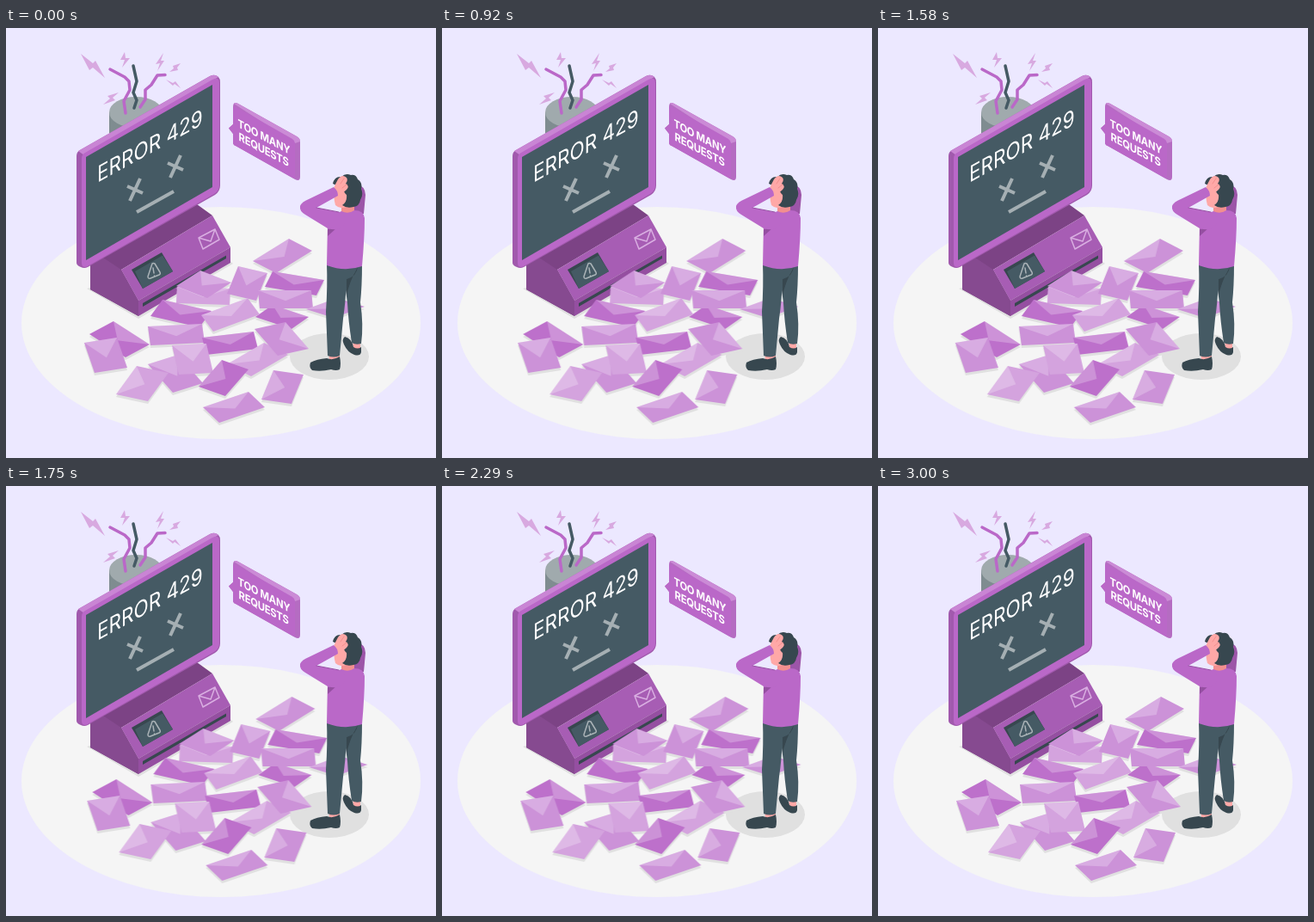
An HTML page that plays this animation: 500x500 px, repeating every 3.04 s.

```html
<!DOCTYPE html>
<html lang="en">
<head>
<meta charset="utf-8">
<title>Error 429</title>
<style>
  html, body { margin: 0; width: 100%; height: 100%; overflow: hidden; background: #ece8ff; }
  svg { display: block; width: 100%; height: 100%; }
  text { font-family: Inter, "Open Sans", sans-serif; fill: #fff; }
  .title { font-size: 26px; }
  .label { font-size: 13px; font-weight: 700; letter-spacing: -.3px; }
  .line { fill: none; stroke-linejoin: round; stroke-linecap: round; }
  .wire { stroke-width: 3.5; }
  .dark { color: #bd70cb; }
  .mid { color: #cc92d8; }
  .light { color: #d4a3de; }
  .mail { filter: drop-shadow(0 3px 0 #e0e0e0); animation: shake 3040ms linear -25ms infinite; }

  /* a three second shake followed by a 40 ms rest */
  @keyframes shake {
    0%, 98.68%, 100% { transform: translateX(0); }
    9.87%, 88.82% { transform: translateX(-1px); }
    19.74%, 78.95% { transform: translateX(2px); }
    29.61%, 49.34%, 69.08% { transform: translateX(-4px); }
    39.47%, 59.21% { transform: translateX(4px); }
  }
</style>
</head>
<body>
<svg viewBox="0 0 500 500">
  <defs>
    <g id="env">
      <path d="M0 0H1V1H0Z" fill="currentColor"/>
      <path d="M0 0H1L.5 .58Z" fill="#fff" opacity=".24"/>
    </g>
  </defs>

  <!-- floor -->
  <ellipse cx="250" cy="343" rx="232" ry="135" fill="#f5f5f5"/>
  <ellipse cx="376" cy="382" rx="46" ry="27" fill="#e0e0e0"/>
  <path d="M94 303L154 338L264 274L250 262Z" fill="#e0e0e0"/>

  <!-- sparks -->
  <g fill="#d8a9e0">
    <path d="M87 30L101 41L104 38L115 58L101 46L97 49Z"/>
    <path d="M138 28L133 37L138 37L135 46L144 35L139 35Z"/>
    <path d="M131 75L118 79L121 82L113 89L127 84L124 81Z"/>
    <path d="M183 29L174 42L179 41L176 50L184 38L180 38Z"/>
    <path d="M203 41L194 44L195 47L190 51L200 49L199 46Z"/>
    <path d="M186 60L194 67L196 65L203 70L197 62L194 64Z"/>
  </g>

  <!-- pipe and wires -->
  <path d="M120 98V130L182 100V98Z" fill="#7f8c90"/>
  <ellipse cx="151" cy="98" rx="31" ry="18" fill="#a0aaad"/>
  <g class="line wire">
    <path d="M121 48L138 57L143 62L144 72L137 85L139 99" stroke="#ba68c8"/>
    <path d="M148 44L152 62L148 75L152 84L149 93" stroke="#455a64"/>
    <path d="M185 54.500L176 55L169 66L162 72L162 83L156 92" stroke="#ba68c8"/>
  </g>

  <!-- console -->
  <path d="M98 275L113 265L222 205L240 218L134 281L154 317V335L98 304Z" fill="#7c4385"/>
  <path d="M98 275L113 267L134 281L154 317V335L98 304Z" fill="#864a90"/>
  <path d="M134 281L240 218L261 255L154 317Z" fill="#a75db4"/>
  <path d="M154 317L261 255V273L154 335Z" fill="#954fa1"/>
  <path d="M159 320L256 264.500V268L159 324Z" fill="#37474f"/>
  <path d="M146 281L181 261L194 283L159 303Z" fill="#37474f"/>
  <path d="M150 283L182 264.500L194 283L159 303Z" fill="#455a64"/>
  <g class="line" stroke="#aab3b7" stroke-width="1.500">
    <path d="M170 274L165 289Q165 292 168 291L178 287Q180 286 179 284L173 274Q171 273 170 274Z"/>
    <path d="M171 279L172 285M172.500 288V288.200"/>
  </g>
  <path class="line" d="M224 244L243 234L248 246L229 257ZL238 248L243 234" stroke="#d9aee1" stroke-width="1.500"/>

  <!-- monitor -->
  <path d="M82 149Q82 144 86 142L237 56Q243 53 247 57Q249 59 249 63V183Q249 190 243 194L95 278Q91 280 87 278Q82 276 82 273Z" fill="#a159ad"/>
  <path d="M84 143L237 56Q243 53 247 57L91 148Z" fill="#c985d4"/>
  <path d="M88 152Q88 147 92 145L240 60Q248 56 248 64V183Q248 189 242 193L95 277Q88 280 88 273Z" fill="#ba68c8"/>
  <path d="M93 150L240 66V185L93 270Z" fill="#455a64"/>
  <text class="title" transform="matrix(.866 -.48 0 1 106 180)">ERROR 429</text>
  <g fill="none" stroke="#a5afb3" stroke-width="4">
    <path d="M141 184L159 192M144 201L156 175"/>
    <path d="M188 157L206 165M191 174L203 148"/>
    <path d="M152 214L195 190"/>
  </g>

  <!-- speech bubble -->
  <path d="M264 112L259 116.500L264 123V133Q264 136 267 137L336 176Q342 179 342 173V132Q342 128 338 126L270 88Q264 85 264 92Z" fill="#b56cc2"/>
  <path d="M265 88Q267 86 270 88L338 126Q342 128 342 132L336 134Z" fill="#cb8bd6"/>
  <path d="M264 112L259 116.500L264 123V133Q264 136 267 137L333 174Q336 176 336 172V134Q336 131 333 129L268 92Q264 90 264 94Z" fill="#ba68c8"/>
  <text class="label" transform="matrix(.866 .46 0 1 269.500 115)">TOO MANY</text>
  <text class="label" transform="matrix(.866 .46 0 1 270.500 130.500)">REQUESTS</text>

  <!-- mail: flap edge, side edge, corner -->
  <g class="mail">
    <use href="#env" class="mid" transform="matrix(42 -26 27 14 287 271)"/>
    <use href="#env" class="light" transform="matrix(62 2 -1 19 199 301)"/>
    <use href="#env" class="mid" transform="matrix(34 8 -13 32 270 277)"/>
    <use href="#env" class="dark" transform="matrix(60 10 -9 18 310 283)"/>
    <use href="#env" class="dark" transform="matrix(42 14 -20 14 310 322)"/>
    <use href="#env" class="mid" transform="matrix(62 0 2 21 293 305)"/>
    <use href="#env" class="mid" transform="matrix(36 -13 32 10 349 327)"/>
    <use href="#env" class="dark" transform="matrix(57 13 -14 19 182 316)"/>
    <use href="#env" class="light" transform="matrix(54 -20 14 19 227 334)"/>
    <use href="#env" class="mid" transform="matrix(36 14 -28 18 226 282)"/>
    <use href="#env" class="dark" transform="matrix(42 27 -28 15 125 341)"/>
    <use href="#env" class="mid" transform="matrix(38 -6 12 35 91 366)"/>
    <use href="#env" class="mid" transform="matrix(63 -3 3 22 165 347)"/>
    <use href="#env" class="dark" transform="matrix(60 -7 5 20 228 360)"/>
    <use href="#env" class="light" transform="matrix(43 -25 28 14 257 391)"/>
    <use href="#env" class="mid" transform="matrix(27 31 -36 8 325 342)"/>
    <use href="#env" class="mid" transform="matrix(35 -11 29 33 165 391)"/>
    <use href="#env" class="light" transform="matrix(40 -2 8 34 193 369)"/>
    <use href="#env" class="light" transform="matrix(-24 33 37 8 152 393)"/>
    <use href="#env" class="dark" transform="matrix(-27 31 31 11 251 386)"/>
    <use href="#env" class="mid" transform="matrix(-14 34 35 5 311 398)"/>
    <use href="#env" class="mid" transform="matrix(53 -18 19 18 229 441)"/>
  </g>

  <!-- man -->
  <path d="M403 362H412V374H404Z" fill="#ffa8a7"/>
  <path d="M375 376H388V386H376Z" fill="#ffa8a7"/>
  <path d="M394 359Q390 362 393 368Q397 377 405 380Q412 382 413 377V371Q409 374 404 371Q402 361 394 359Z" fill="#37474f"/>
  <path d="M354 389Q361 385 373 384Q380 387 388 382Q390 391 388 397Q384 399 378 397Q366 400 356 398Q352 395 354 389Z" fill="#37474f"/>
  <path d="M393 275H414Q414 300 412 319Q416 345 413 367Q407 369 402 366Q398 340 397 320L394 297Z" fill="#455a64"/>
  <path d="M409 277Q408 289 396 292L396 312Q398 298 409 277Z" fill="#37474f"/>
  <path d="M373 274H409Q408 287 396 292Q395 318 392 338L388 381Q381 384 374 381Q373 355 372 330Q374 300 373 274Z" fill="#455a64"/>
  <path d="M407 181Q418 184 418 194L416 216H403Z" fill="#9c55a8"/>
  <path d="M390 201H405V219H390Z" fill="#f28f8f"/>
  <path d="M390 213Q398 217 405 212Q416 212 417 221Q417 243 414 277Q394 284 373 276L374 228Q379 217 390 213Z" fill="#ba68c8"/>
  <path d="M374 234L385 232L374 242Z" fill="#954fa1"/>
  <path d="M383 184Q380 196 383 206Q388 211 396 208L401 185Z" fill="#ffa8a7"/>
  <path d="M380 181Q382 172 390 173Q395 168 401 171Q407 170 409 176Q415 180 413 187Q416 194 412 200Q411 207 404 208Q396 210 391 206Q397 202 396 194Q391 190 393 184Q386 185 380 181Z" fill="#37474f"/>
  <path d="M380 189Q383 181 386 176Q391 169 396 174Q398 177 395 181Q400 184 396 188Q391 193 385 196Z" fill="#ffa8a7"/>
  <path class="line" d="M389 181L393 175M391 186L396 182" stroke="#f28f8f"/>
  <path d="M381 185Q386 189 386 195L361 209L391 215Q398 224 391 232Q385 236 374 233L348 217Q341 213 342 207Q344 202 352 199Z" fill="#ba68c8"/>
  <path class="line" d="M361 209L387 214" stroke="#954fa1"/>
</svg>
</body>
</html>
```
